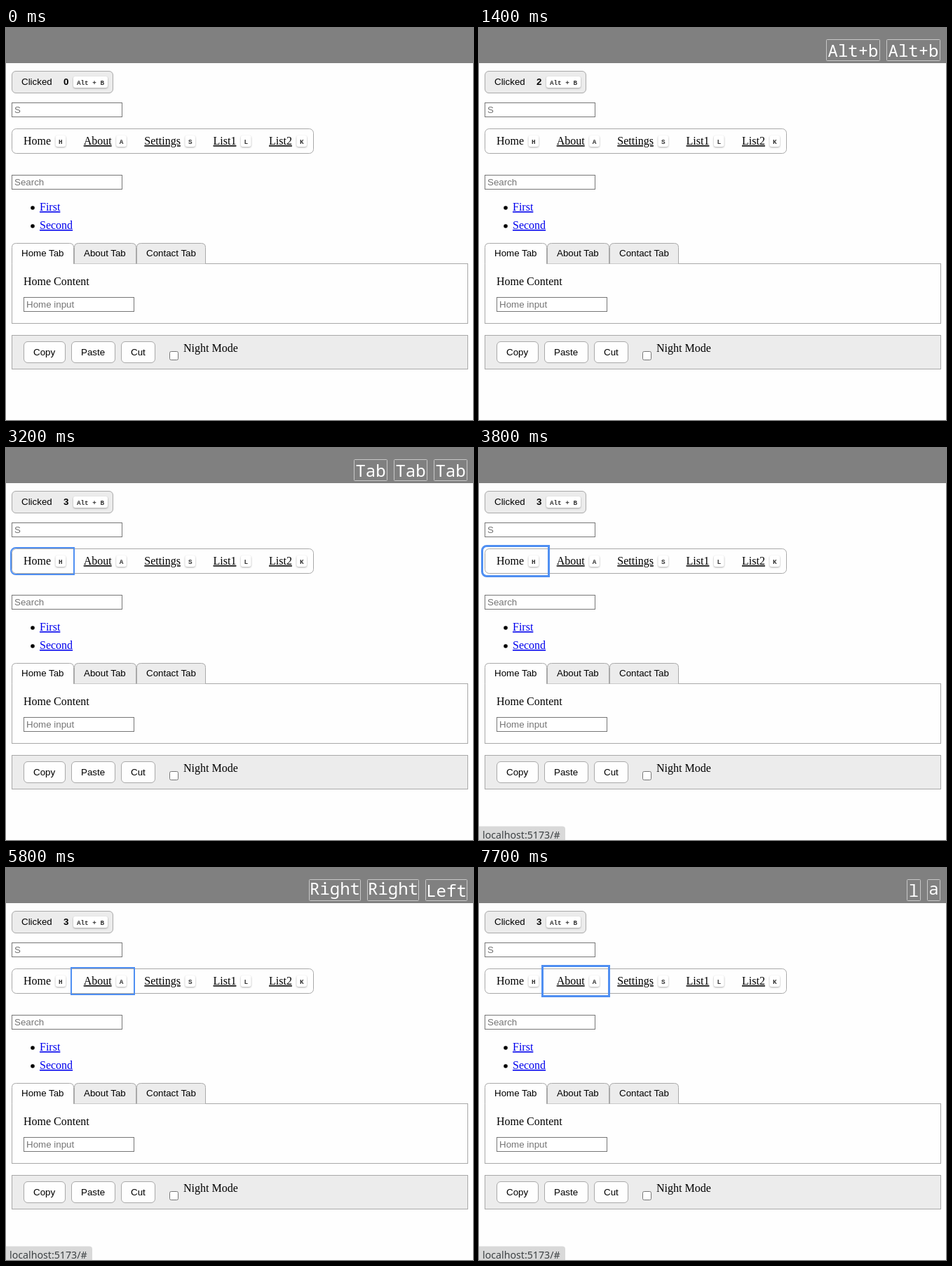
Animation, 666 px wide and 558 px high, one loop 8000 ms. Source, as an HTML page:

```html
<!DOCTYPE html>
<html lang="en">
<head>
<meta charset="utf-8">
<title>Keyboard navigation demo</title>
<style>
html, body { margin: 0; width: 666px; height: 558px; overflow: hidden; background: #fefefe; }
svg { display: block; }
.sans { font: 13.333px "Liberation Sans", Arial, sans-serif; }
.serif { font: 16px "Liberation Serif", "Times New Roman", serif; }
.kbd { font: bold 9.33px "Liberation Mono", monospace; fill: #333; text-anchor: middle; }
.cap { fill: #fff; filter: drop-shadow(0 1px 1px rgba(0,0,0,.32)); }
.key { font: 24px "Noto Sans Mono", monospace; fill: #fff; text-anchor: middle; }
.status { font: 14.2px "Noto Sans", sans-serif; fill: #3c4043; }
.bold { font-weight: bold; }
.hint { fill: #757575; }
.link { text-decoration: underline; }
.blue { fill: #0000ee; }
#ring, #pressed { position: absolute; box-sizing: border-box; }
#ring { border: solid #4f8ff2; }
#pressed { left: 9px; top: 62px; width: 143px; height: 30px; border-radius: 5px; box-shadow: inset 0 2px 3px rgba(0,0,0,.2); }
</style>
</head>
<body>
<svg id="stage" width="666" height="558"></svg>
<div id="pressed"></div>
<div id="ring"></div>
<script>
const LOOP = 8000, GREY = '#ececec', LINE = '#a9a9a9';
const $ = id => document.getElementById(id);

const text = (x, y, s, cls) => `<text x="${x}" y="${y}" class="${cls}">${s}</text>`;
const box = (x, y, w, h, r = 0, fill = '#fefefe', stroke = LINE) =>
  `<rect x="${x + .5}" y="${y + .5}" width="${w - 1}" height="${h - 1}" rx="${r}" fill="${fill}" stroke="${stroke}"/>`;
const input = (x, y, hint) => box(x, y, 158, 21, 0, '#fff', '#767676') + text(x + 4, y + 15, hint, 'sans hint');
const kbd = (x, y, w, s) =>
  `<rect x="${x}" y="${y}" width="${w}" height="16" rx="3" class="cap"/>` + text(x + w / 2, y + 11.5, s, 'kbd');
const tab = (x, w, s, fill) =>
  `<path d="M${x + .5} 335.5V312.5q0-6 6-6H${x + w - 6.5}q6 0 6 6V335.5" fill="${fill}" stroke="${LINE}"/>` +
  text(x + 14, 325, s, 'sans');
const button = (x, w, s) => box(x, 446, w, 31, 5.5) + text(x + 14, 466, s, 'sans');

// label, key, text left, text width
const menu = [['Home', 'H', 25, 39.1], ['About', 'A', 110.7, 40], ['Settings', 'S', 197.3, 51.6],
  ['List1', 'L', 295.5, 32.9], ['List2', 'K', 375, 32.9]];

$('stage').innerHTML =
  '<rect width="666" height="50" fill="#808080"/><g id="keys"></g>' +
  box(8, 61, 145, 32, 5.5, GREY) +
  '<g id="face">' + text(22, 81, 'Clicked', 'sans') +
  '<text id="count" x="82" y="81" class="sans bold">0</text>' + kbd(96, 69, 49, 'Alt + B') + '</g>' +
  input(8, 106, 'S') +
  box(8, 143, 431, 36, 6) +
  menu.map(([s, k, x, w], i) => text(x, 166, s, i ? 'serif link' : 'serif') + kbd(x + w + 6.5, 153, 14.6, k)).join('') +
  input(8, 209, 'Search') +
  ['First', 'Second'].map((s, i) =>
    `<circle cx="38" cy="${256 + 26 * i}" r="2.8"/>` + text(48, 260 + 26 * i, s, 'serif link blue')).join('') +
  box(8, 335, 651, 86) +
  tab(97, 89, 'About Tab', GREY) + tab(186, 99, 'Contact Tab', GREY) + tab(8, 89, 'Home Tab', '#fefefe') +
  '<rect x="9" y="335" width="87" height="1" fill="#fefefe"/>' +
  text(25, 366, 'Home Content', 'serif') + input(25, 383, 'Home input') +
  box(8, 437, 651, 49, 0, GREY) +
  button(25, 60, 'Copy') + button(93, 63, 'Paste') + button(164, 49, 'Cut') +
  box(233, 460, 13, 13, 2, '#fff', '#767676') + text(253, 461, 'Night Mode', 'serif') +
  '<g id="status"><path d="M0 538.5H119q4 0 4 4V558H0z" fill="#d9d9d9"/>' +
  text(5, 556, 'localhost:5173/#', 'status') + '</g>';

// width of the key cap and baseline of its label
const caps = { 'Alt+b': [77, 40.7], Tab: [48, 40.7], Right: [74, 38], Left: [60, 40.7], l: [20, 40.7], a: [19, 38] };
const presses = [[700, 'Alt+b'], [1200, 'Alt+b'], [1600, 'Alt+b'], [2500, 'Tab'], [2800, 'Tab'], [3100, 'Tab'],
  [4800, 'Right'], [5300, 'Right'], [5700, 'Left'], [6800, 'l'], [7500, 'a']];
const clears = [0, 2400, 3800, 6500];
const clicks = [[800, 1000], [1300, 1400], [1700, 1900]];

// focusable areas: left, top, right, bottom, corner radii
const item = (i, r = '0') => [menu[i][2] - 16, 144, menu[i + 1][2] - 16, 178, r];
const home = item(0, '8px 0 0 8px'), about = item(1);
const focus = [[2600, [8, 61, 153, 93, '9px']], [2900, [8, 106, 166, 127, '0']], [3200, home],
  [4900, about], [5300, item(2)], [5800, about], [6900, item(3)], [7600, about]];

function drawKeys(t) {
  const since = clears.filter(c => c <= t).pop();
  let right = 658, out = '';
  for (const [, s] of presses.filter(([at]) => at >= since && at <= t).reverse()) {
    const [w, base] = caps[s];
    out += box(right - w, 16, w, 31, 1, 'none', '#c8c8c8') + text(right - w / 2, base, s, 'key');
    right -= w + 9;
  }
  if (out !== drawKeys.last) $('keys').innerHTML = drawKeys.last = out;
}

function drawRing(t) {
  const now = focus.filter(([at]) => at <= t).pop(), ring = $('ring').style;
  ring.display = now ? 'block' : 'none';
  if (!now) return;
  const [at, [l, top, r, b, radius]] = now;
  const grown = t - at >= 100, out = grown ? 6 : 3;
  ring.left = Math.round(l - out) + 'px';
  ring.top = top - out + 'px';
  ring.width = Math.round(r + out) - Math.round(l - out) + 'px';
  ring.height = b - top + 2 * out + 'px';
  ring.borderWidth = grown ? '3px' : '2px';
  ring.borderRadius = radius;
}

function draw() {
  const t = performance.now() % LOOP;
  const down = clicks.some(([a, b]) => t >= a && t < b);
  $('count').textContent = clicks.filter(([a]) => t >= a).length;
  $('face').setAttribute('transform', `translate(0 ${down ? 1 : 0})`);
  $('pressed').style.display = down ? 'block' : 'none';
  $('status').style.display = t >= 3400 ? '' : 'none';
  drawKeys(t);
  drawRing(t);
  requestAnimationFrame(draw);
}
draw();
</script>
</body>
</html>
```
